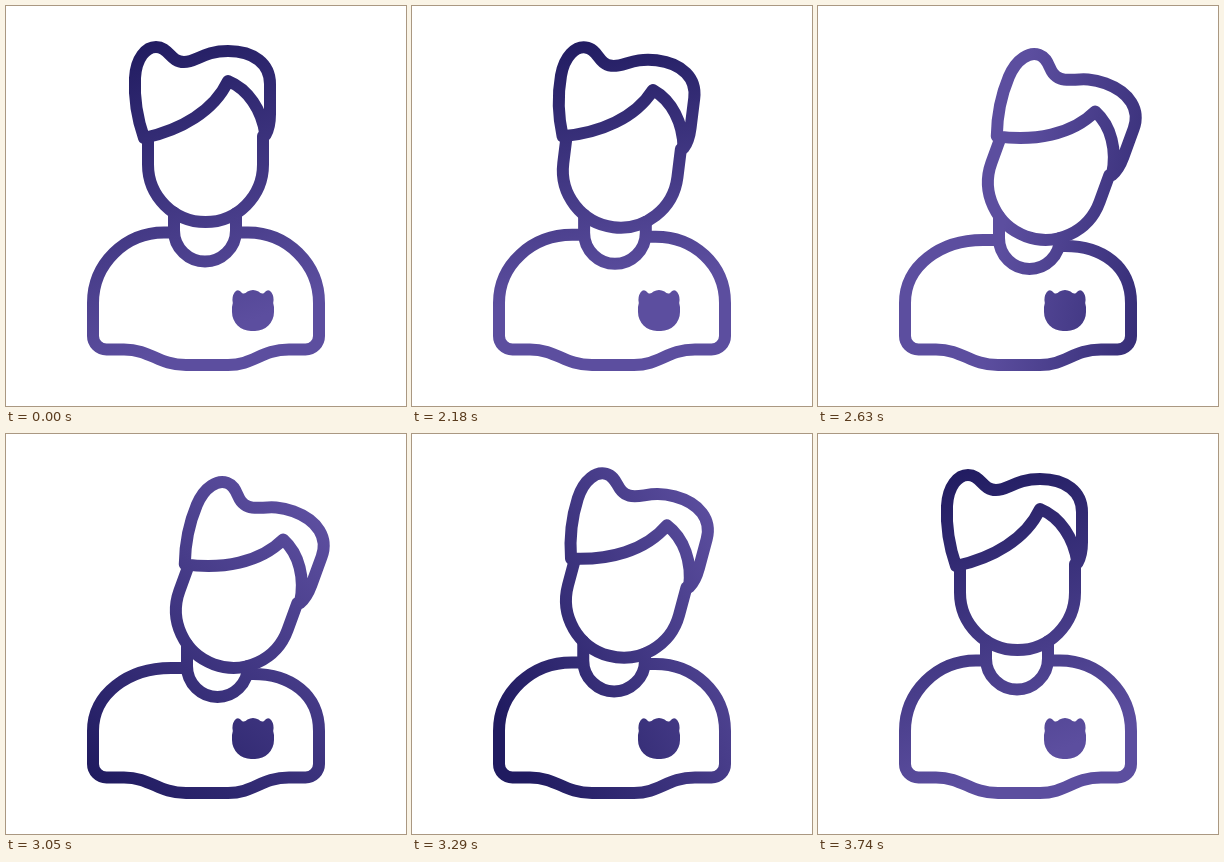
Recreate the animation shown at these times as an HTML page with a canvas. Size 400 by 400 pixels, loop 3770 ms.

```html
<!DOCTYPE html>
<html lang="en">
<head>
<meta charset="utf-8">
<title>Leaning figure</title>
<style>
html, body { margin: 0; width: 100%; height: 100%; overflow: hidden; background: #fff; }
canvas { display: block; width: 400px; height: 400px; }
</style>
</head>
<body>
<canvas id="stage"></canvas>
<script>
const LOOP = 3770, REST = 2030, STEP = 30;
const DARK = '#201b60', LIGHT = '#5c4e9f';
const HEAD = { x: 199.5, y: 158.5, r: 57.5 };
const LEAN = 20;

const canvas = document.getElementById('stage');
const ctx = canvas.getContext('2d');
const scale = window.devicePixelRatio || 1;
canvas.width = canvas.height = 400 * scale;

const hair = new Path2D(`M138 132 C131 112 128 92 129 72 C130 52 140 41 150 41
  C163 41 164 56 178 56 C190 56 198 45 222 45 C248 45 264 58 264 78
  V108 C264 117 263 123 259.5 129 C256 104 242 83 222 75 C208 105 175 124 138 132 Z`);
const face = new Path2D('M142 132 V158.5 A57.5 57.5 0 0 0 257 158.5 V130');
const badge = new Path2D(`M228.5 286.5 Q232 282 236 287 Q238.5 288.5 241.5 285.5
  Q247 282.5 252.5 285.5 Q255.5 288.5 258 287 Q262 282 265.5 286.5
  Q268.5 291 267.2 297 Q268.5 301 268 306 A19 19 0 0 1 249 325 H245
  A19 19 0 0 1 226 306 Q225.5 301 226.8 297 Q225.5 291 228.5 286.5 Z`);

// time, dark end x y, light end x y
const shades = [
  [2000, 127, 35, 230, 320],
  [2330, 215, 20, 208, 245],
  [2630, 425, 225, 190, 190],
  [3050, 82, 338, 312, 85],
  [3290, 80, 270, 340, 150],
  [3740, 127, 35, 230, 320]
];

const mix = (a, b, p) => a + (b - a) * p;

function ease(t, start, span) {
  const x = Math.min(1, Math.max(0, (t - start) / span));
  return x * x * (3 - 2 * x);
}

// Leans in, holds, then returns
const lean = (t, inSpan, outSpan) => ease(t, 2000, inSpan) - ease(t, 3080, outSpan);

function shadeAt(t) {
  let i = 0;
  while (i < shades.length - 2 && t > shades[i + 1][0]) i++;
  const a = shades[i], b = shades[i + 1];
  const p = Math.min(1, Math.max(0, (t - a[0]) / (b[0] - a[0])));
  return a.slice(1).map((v, k) => mix(v, b[k + 1], p));
}

function bodyPath(n, cx, cy) {
  const left = 168 + 13 * n, right = 230 + 12 * n;
  const yl = 226.5 + 7.5 * n, yr = 226.5 + 13.5 * n;
  const mid = (left + right) / 2, base = 255.5 + 7.5 * n;
  const jaw = x => cy + Math.sqrt(HEAD.r ** 2 - (x - cx) ** 2);
  const sx = 158 + 7 * n, ex = 242 + 5 * n;
  return new Path2D(`M${left} ${yl} H${sx}
    C${mix(119, 122, n)} ${yl} 87 ${258 + 2 * n} 87 297
    V330 A13.5 13.5 0 0 0 100.5 343.5 H118 C145 343.5 152 359 180 359 H222
    C248 359 255 343.5 283 343.5 H299.5 A13.5 13.5 0 0 0 313 330 V297
    C313 ${258 + 2 * n} ${mix(281, 284, n)} ${yr} ${ex} ${yr} H${right}
    M${left} ${jaw(left)} V${base - 31} C${left} ${base - 13} ${mid - 16} ${base} ${mid} ${base}
    S${right} ${base - 13} ${right} ${Math.max(base - 31, jaw(right))} V${jaw(right)}`);
}

// Gradient ends are in stage space, so head paths are moved rather than the context
function placed(path, matrix) {
  const out = new Path2D();
  out.addPath(path, matrix);
  return out;
}

function draw(t) {
  const neck = lean(t, 480, 312);
  const shift = lean(t, 480, 384);
  const turn = lean(t, 450, 644) * LEAN;
  const cx = HEAD.x + 28 * shift, cy = HEAD.y + 17.8 * shift;

  ctx.setTransform(scale, 0, 0, scale, 0, 0);
  ctx.fillStyle = '#fff';
  ctx.fillRect(0, 0, 400, 400);

  const paint = ctx.createLinearGradient(...shadeAt(t));
  paint.addColorStop(0, DARK);
  paint.addColorStop(1, LIGHT);
  ctx.strokeStyle = ctx.fillStyle = paint;
  ctx.lineWidth = 12;
  ctx.lineCap = ctx.lineJoin = 'round';

  const matrix = new DOMMatrix()
    .translate(cx, cy)
    .rotate(turn)
    .translate(-HEAD.x, -HEAD.y);
  ctx.stroke(bodyPath(neck, cx, cy));
  ctx.stroke(placed(face, matrix));
  ctx.stroke(placed(hair, matrix));
  ctx.fill(badge);
}

const begin = performance.now();
function frame() {
  const t = (performance.now() - begin) % LOOP;
  draw(t < REST ? 0 : REST + Math.floor((t - REST) / STEP) * STEP);
  requestAnimationFrame(frame);
}
frame();
</script>
</body>
</html>
```
